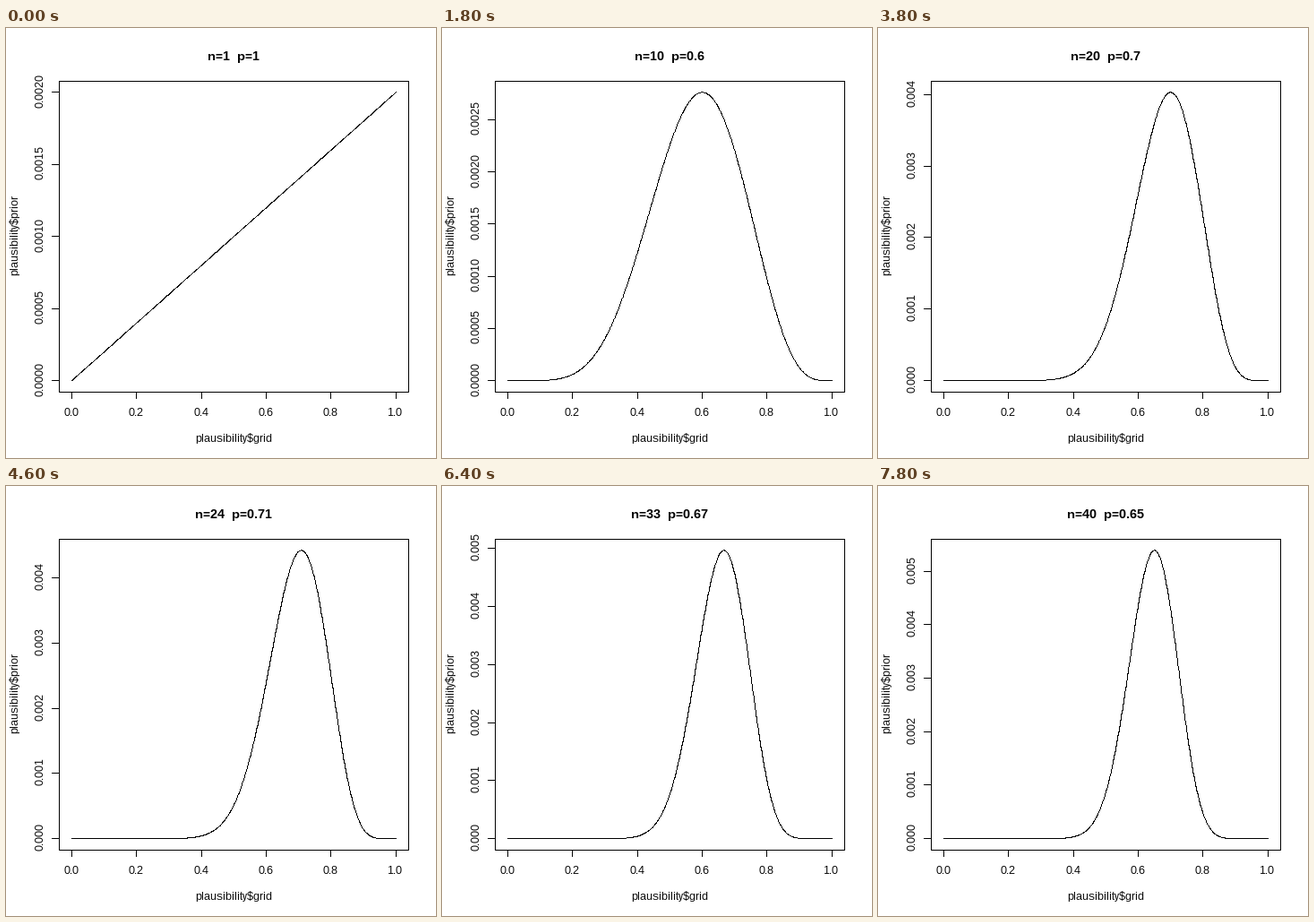
Write a matplotlib script that moves like this. It is 480 px wide and 480 px high and loops after 8 s.

```python
import numpy as np
import matplotlib.pyplot as plt
from matplotlib.animation import FuncAnimation

SIZE, DPI = 480, 72
plt.rcParams.update({
    "font.family": "Liberation Sans",
    "font.size": 12,
    "text.hinting": "native",
    "text.hinting_factor": 1,
    "text.parse_math": False,
})

# Outcome of every toss: W adds a success, L a failure
TOSSES = "WLWLLWL" + "W" * 11 + "LL" + "WWLW" + "WWWLWLW" + "LL" + "WWLWWLL"
GRID = np.linspace(0, 1, 1000)

# Plot box in pixels, with 4 % of the data range as padding on each side
LEFT, RIGHT, TOP, BOTTOM = 59.04, 449.76, 59.04, 406.56
MID_X, MID_Y = (LEFT + RIGHT) / 2, (TOP + BOTTOM) / 2
X_UNIT, Y_UNIT = (RIGHT - LEFT) / 1.08, (BOTTOM - TOP) / 1.08
MAX_TICKS = 9


def to_x(v):
    return LEFT + X_UNIT * (0.04 + v)


def to_y(v):
    return BOTTOM - Y_UNIT * (0.04 + v)


def pixel(v):
    """Centre of the pixel that holds v."""
    return int(v) + 0.5


fig = plt.figure(figsize=(SIZE / DPI, SIZE / DPI), dpi=DPI, facecolor="white")
ax = fig.add_axes([0, 0, 1, 1])
image = ax.imshow(np.ones((SIZE, SIZE)), cmap="gray", vmin=0, vmax=1,
                  extent=(0, SIZE, SIZE, 0), interpolation="nearest",
                  aspect="auto")
ax.set(xlim=(0, SIZE), ylim=(SIZE, 0))
ax.axis("off")


def line(xs, ys):
    return ax.plot(xs, ys, color="black", lw=1, snap=False,
                   solid_capstyle="butt", solid_joinstyle="miter")[0]


def label(x, y, text="", **kw):
    return ax.text(x, y, text, ha="center", va="baseline", color="black", **kw)


def top_label(x, y, text="", **kw):
    return label(x - 0.5, y, text, **kw)


def side_label(x, y, text=""):
    return label(x, y - 2, text, rotation=90, rotation_mode="anchor")


# Static parts: box, horizontal axis, axis titles
x0, x1, y0, y1 = map(pixel, (LEFT, RIGHT, TOP, BOTTOM))
line([x0, x1, x1, x0, x0, x1], [y0, y0, y1, y1, y0, y0])
for v in np.arange(6) / 5:
    px = to_x(v)
    line([pixel(px)] * 2, [407, 414])
    top_label(px, 433, f"{v:.1f}")
top_label(MID_X, 462, "plausibility$grid")
side_label(13, MID_Y, "plausibility$prior")

# Parts that follow the data
title = top_label(MID_X, 36, fontsize=14, fontweight="bold")
y_ticks = [(line([51, 59], [0, 0]), side_label(42, 0)) for _ in range(MAX_TICKS)]


def posterior(wins, losses):
    density = GRID ** wins * (1 - GRID) ** losses
    return density / density.sum()


def rasterize(xs, ys, substeps=15):
    """Join whole-pixel points with hard one-pixel strokes.

    An odd number of substeps keeps samples off pixel borders.
    """
    idx = np.arange(len(xs))
    t = np.linspace(0, len(xs) - 1, (len(xs) - 1) * substeps + 1)
    cols = np.rint(np.interp(t, idx, np.floor(xs))).astype(int)
    rows = np.rint(np.interp(t, idx, np.floor(ys))).astype(int)
    canvas = np.ones((SIZE, SIZE))
    canvas[rows, cols] = 0
    return canvas


def update(i):
    n = i + 1
    wins = TOSSES[:n].count("W")
    prob = posterior(wins, n - wins)
    peak = prob.max()

    title.set_text(f"n={n}  p={round(wins / n, 2):g}")
    image.set_data(rasterize(to_x(GRID), to_y(prob / peak)))

    step, digits = (0.001, 3) if peak > 0.0036 else (0.0005, 4)
    for k, (tick, text) in enumerate(y_ticks):
        v = k * step
        shown = v <= 1.04 * peak
        tick.set_visible(shown)
        text.set_visible(shown)
        if shown:
            py = to_y(v / peak)
            tick.set_ydata([pixel(py)] * 2)
            text.set_y(py - 2)
            text.set_text(f"{v:.{digits}f}")
    return [image, title]


anim = FuncAnimation(fig, update, frames=len(TOSSES), interval=200,
                     repeat=True, repeat_delay=0, blit=False)
plt.show()
```
